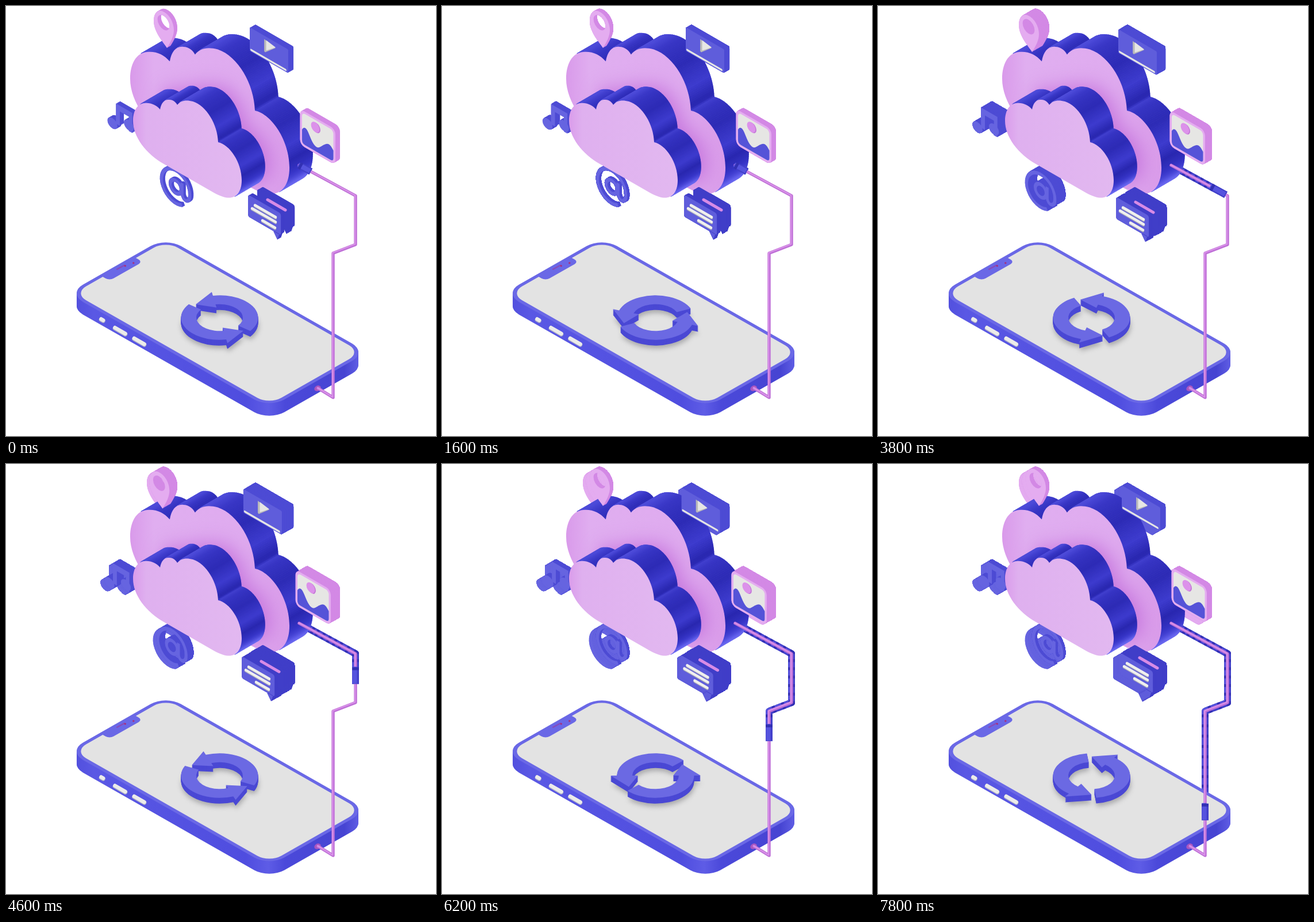
An HTML page with a canvas that plays this animation: 748x748 px, repeating every 8 s.

```html
<!DOCTYPE html>
<html lang="en">
<head>
<meta charset="utf-8">
<title>Cloud sync</title>
<style>
  html, body { margin: 0; width: 100%; height: 100%; overflow: hidden; background: #fff; }
  canvas { display: block; width: 748px; height: 748px; }
  svg { position: absolute; width: 0; height: 0; }
</style>
</head>
<body>
<canvas id="stage" width="748" height="748"></canvas>
<svg><path id="cloud" d="M221 200C221 183 228 170 241 169C252 168 261 172 268 180C270 168 276 162 284 163C291 163 296 168 298 172C304 164 314 163 325 166C349 174 368 206 369 237C389 241 410 272 410 303C410 327 397 338 378 332C371 330 366 327 362 325L275 275C243 257 221 227 221 200Z"/></svg>
<script>
const SIZE = 748, STEP = 200, LOOP = 8000, SLOPE = 0.577;
const BLUE = '#6664e0', BLUE_SIDE = '#4d4bd4', PANEL = '#5f5ddb', PANEL_SIDE = '#403ec8';
const PINK = '#e4acf0', PINK_SIDE = '#d389e5', PALE = '#e6e6e4';

const stage = document.getElementById('stage').getContext('2d');
const makeLayer = () => {
  const c = document.createElement('canvas');
  c.width = c.height = SIZE;
  return c.getContext('2d');
};

// Linear lookup in a table of [key, value...] rows.
function lookup(table, x) {
  if (x <= table[0][0]) return table[0].slice(1);
  const i = table.findIndex(row => row[0] >= x);
  if (i < 0) return table[table.length - 1].slice(1);
  const a = table[i - 1], b = table[i], k = (x - a[0]) / (b[0] - a[0]);
  return a.slice(1).map((v, j) => v + (b[j + 1] - v) * k);
}

// Run a drawing with a wall-facing isometric plane at (x, y).
function onWall(c, x, y, draw) {
  c.save();
  c.transform(0.866, 0.5, 0, 1, x, y);
  draw();
  c.restore();
}

function fillPath(c, path, color, rule = 'nonzero') {
  c.fillStyle = color;
  c.fill(path, rule);
}

// Stack slices from the back (depth) to the front (-reach), the last one being the face.
function extrude(c, x, y, depth, reach, side, face, draw) {
  for (let k = depth; k > -reach; k -= 0.8) onWall(c, x + k, y - k * SLOPE, () => draw(side));
  onWall(c, x - reach, y + reach * SLOPE, () => draw(face));
}

function roundRect(x, y, w, h, r) {
  const p = new Path2D();
  p.roundRect(x, y, w, h, r);
  return p;
}

function line(c, x1, y1, x2, y2, width, color) {
  c.lineCap = 'round';
  c.lineWidth = width;
  c.strokeStyle = color;
  c.beginPath();
  c.moveTo(x1, y1);
  c.lineTo(x2, y2);
  c.stroke();
}

// ---------- floating icons ----------
const reach = {
  pin: [[2, 0], [3, 8], [3.7, 12], [4.1, 12], [5.5, 0]],
  music: [[1.4, 0], [1.6, 1.6], [2.6, 12], [3.8, 12], [5.2, 0]],
  mail: [[1.8, 0], [3, 9.5], [3.6, 12], [3.9, 12], [5.4, 0]],
  video: [[3, 0], [3.8, 6], [4.9, 13], [5.6, 13], [7, 0]],
  photo: [[3.1, 0], [3.8, 4], [5.2, 11], [5.7, 11], [7, 3.5], [7.8, 1]],
  chat: [[3, 0], [3.8, 7], [4.8, 12], [5.6, 12], [6.9, 0]]
};

// The pin outline is given in screen space, so it is slid rather than skewed.
const pinShape = new Path2D('M280 73C273 62 257 45 257 26C257 12 264 6 272 9C284 14 292 28 292 42C292 52 287 62 280 73Z');
pinShape.addPath(roundRect(-12, -12, 24, 24, 12), new DOMMatrix([0.866, 0.5, 0, 1, 274, 29]));

const noteShape = new Path2D('M-1 -33H32V2H25V-23H7V2H-1Z');
noteShape.ellipse(-8, 5, 10, 9, 0, 0, 7);
noteShape.moveTo(35, -8);
noteShape.ellipse(25, -8, 10, 9, 0, 0, 7);

const mailShape = new Path2D();
mailShape.arc(0, 0, 28.5, 1.1, 6.35);
mailShape.bezierCurveTo(28, 16, 14, 18, 13, 6);
mailShape.lineTo(13, -13);
mailShape.moveTo(11, 0);
mailShape.arc(0, 0, 11, 0, 6.3);

const card = roundRect(0, 0, 77.4, 41, 2);
const frame = roundRect(0, 0, 71, 62, 9);
const hill = new Path2D('M4 34C8 26 13 26 18 35C25 47 31 53 38 48C46 41 54 30 60 33C63 34 65 37 67 39V52Q67 58 61 58H10Q4 58 4 52Z');
const bubble = roundRect(0, 0, 66, 38, 4);
bubble.addPath(new Path2D('M50 37L59 49L63 37Z'));

function slidePin(c, k, color) {
  c.save();
  c.translate(k, -k * SLOPE);
  fillPath(c, pinShape, color, 'evenodd');
  c.restore();
}

const bodies = {
  pin(c, d) {
    for (let k = 6; k > -d; k -= 0.8) slidePin(c, k, PINK_SIDE);
    slidePin(c, -d, PINK);
  },
  music(c, d) {
    extrude(c, 192, 203, 7, d, BLUE_SIDE, BLUE, color => fillPath(c, noteShape, color));
  },
  mail(c, d) {
    extrude(c, 295, 314.5, 4, d, BLUE_SIDE, BLUE, color => {
      c.lineCap = 'butt';
      c.lineWidth = 6;
      c.strokeStyle = color;
      c.stroke(mailShape);
    });
  },
  video(c, d) {
    extrude(c, 424, 37, 9, d, BLUE_SIDE, PANEL, color => fillPath(c, card, color));
  },
  photo(c, d) {
    extrude(c, 511.5, 179, 8, d, PINK_SIDE, PINK, color => fillPath(c, frame, color));
  },
  chat(c, d) {
    extrude(c, 437, 318, 8, d, PANEL_SIDE, PANEL_SIDE, color => fillPath(c, bubble, color));
    line(c, 455 - d, 337 + d * SLOPE, 486 - d, 355 + d * SLOPE, 5, '#d78be6');
    extrude(c, 421, 328, 6 - d, d, PANEL_SIDE, PANEL, color => fillPath(c, bubble, color));
  }
};

const details = {
  video(c, d) {
    onWall(c, 424 - d, 37 + d * SLOPE, () => {
      fillPath(c, new Path2D('M29 6L52 10L31 28L29 27Z'), '#b9b9ba');
      fillPath(c, new Path2D('M33 6L52 9L33 24Z'), PALE);
      line(c, 3, 38, 72, 38, 3.6, PALE);
    });
  },
  photo(c, d) {
    onWall(c, 511.5 - d, 179 + d * SLOPE, () => {
      fillPath(c, roundRect(4, 4, 63, 54, 6), PALE);
      fillPath(c, hill, '#5553d8');
      fillPath(c, roundRect(24, 8, 17, 17, 9), '#c577d8');
      fillPath(c, roundRect(22, 8, 17, 17, 9), '#dc92ea');
    });
  },
  chat(c, d) {
    c.save();
    c.translate(-d, d * SLOPE);
    for (const [x, y, w] of [[433, 346.5, 36], [428, 352, 41], [446, 373, 22]]) {
      line(c, x, y + 1.5, x + w, y + 1.5 + w * SLOPE, 4.5, '#a9a9b8');
      line(c, x, y, x + w, y + w * SLOPE, 4.5, '#f0f0ee');
    }
    c.restore();
  }
};

function drawIcons(c, parts, names, t) {
  for (const name of names) if (parts[name]) parts[name](c, lookup(reach[name], t)[0]);
}

// ---------- cable and plug ----------
const cable = new Path2D('M510 277L608 330V415L569 430V681L543 665');
const plugEnd = [[1.6, 23], [2, 26], [2.5, 40], [3, 62], [3.8, 108], [4.7, 171], [5.6, 238], [6.3, 299], [7, 362], [7.8, 428]];

function drawCable(c) {
  c.lineCap = c.lineJoin = 'round';
  c.lineWidth = 5.4;
  c.strokeStyle = '#bf70d7';
  c.stroke(cable);
  c.lineWidth = 2.2;
  c.strokeStyle = '#d992e8';
  c.save();
  c.translate(-0.8, -0.8);
  c.stroke(cable);
  c.restore();
}

function drawPlug(c, t) {
  const end = lookup(plugEnd, t)[0], start = Math.max(0, end - 29);
  const band = (from, to, width, color) => {
    c.setLineDash([0, from, to - from, 2000]);
    c.lineWidth = width;
    c.strokeStyle = color;
    c.stroke(cable);
  };
  c.save();
  c.lineCap = 'butt';
  c.lineJoin = 'round';
  band(start, end, 12, '#4240ca');
  c.translate(-1.5, -1);
  band(start, end, 8, '#5553de');
  c.translate(1.5, 1);
  band(start, start + 5, 12, '#3230b4');
  c.restore();
}

// ---------- phone ----------
const FLOOR = [0.874, 0.498, 0.874, -0.498];

function drawPhone(c) {
  const body = roundRect(-200.5, -97.5, 401, 195, 30);
  const side = c.createLinearGradient(123, 0, 613, 0);
  [[0, '#5250de'], [0.06, '#5a58e4'], [0.6, '#4f4ddf'], [0.68, '#5e5ce6'], [0.74, '#4b49da'], [0.95, '#4644d2'], [1, '#5f5de4']]
    .forEach(([p, color]) => side.addColorStop(p, color));
  for (let k = 22; k > 0; k--) {
    const slice = new Path2D();
    slice.addPath(body, new DOMMatrix([...FLOOR, 368, 551 + k]));
    fillPath(c, slice, side);
  }
  c.save();
  c.transform(...FLOOR, 368, 551);
  fillPath(c, body, '#6a68e6');
  fillPath(c, roundRect(-194.5, -91.5, 389, 183, 24), '#e3e3e3');
  fillPath(c, roundRect(-197, -34, 16, 66, [0, 8, 8, 0]), '#6a68e6');
  c.restore();
  line(c, 193, 458, 206, 451, 2, '#8a4bb8');
  line(c, 207, 452, 207.5, 452, 3, '#a8307a');
  line(c, 221.5, 447, 222, 447, 3, '#a8307a');
  for (const [x, y, w] of [[165.5, 544.5, 3.5], [189.5, 559.5, 18], [223, 578, 17.5]]) {
    line(c, x, y + 1, x + w, y + 1 + w * SLOPE, 7.5, '#b4b4c8');
    line(c, x, y, x + w, y + w * SLOPE, 6.5, '#ececea');
  }
  c.fillStyle = '#a956bf';
  c.beginPath();
  c.ellipse(542, 665, 6, 4.5, -0.5, 0, 7);
  c.fill();
}

// ---------- sync arrows ----------
const turn = [[0, 100], [1.6, 161], [3, 222], [3.8, 254], [5.6, 337], [7, 391], [7.8, 414]];

function arrowsPath(deg) {
  const p = new Path2D();
  const rad = a => -a * Math.PI / 180;
  const to = (r, a) => p.lineTo(r * Math.cos(rad(a)), r * Math.sin(rad(a)));
  for (const head of [deg, deg + 180]) {
    const tail = head - 137;
    p.moveTo(54.7 * Math.cos(rad(tail)), 54.7 * Math.sin(rad(tail)));
    p.arc(0, 0, 54.7, rad(tail), rad(head), true);
    to(64, head);
    to(47, head + 36);
    to(25, head);
    p.arc(0, 0, 33, rad(head), rad(tail), false);
    p.closePath();
  }
  return p;
}

function drawSync(c, t) {
  const arrows = arrowsPath(lookup(turn, t)[0]);
  const slice = (dx, dy, color) => {
    c.save();
    c.translate(371.5 + dx, 542 + dy);
    c.scale(1.2247, 0.7071);
    fillPath(c, arrows, color);
    c.restore();
  };
  c.save();
  c.filter = 'blur(4px)';
  slice(1, 15, 'rgba(110,110,115,.5)');
  c.restore();
  for (let k = 10; k > 0; k--) slice(0, k, '#4a48d4');
  slice(0, 0, '#6b69e3');
}

// ---------- clouds ----------
// Wall colour by the direction the wall faces, in degrees on screen.
const ramp = [[-140, 90, 88, 220], [-90, 76, 74, 216], [-60, 56, 54, 196], [-35, 46, 44, 182], [-18, 62, 60, 206],
  [-6, 42, 40, 176], [8, 56, 54, 200], [30, 96, 94, 234], [60, 122, 120, 244]];
const cloudLine = document.getElementById('cloud');
const cloudPath = new Path2D(cloudLine.getAttribute('d'));
const RISE = 0.585;

function cloudWalls(c, sx, sy, ox, oy) {
  const total = cloudLine.getTotalLength(), count = 260, points = [], walls = [];
  for (let i = 0; i <= count; i++) {
    const p = cloudLine.getPointAtLength(total * i / count);
    points.push([p.x * sx + ox, p.y * sy + oy]);
  }
  for (let i = 0; i < count; i++) {
    const [x, y] = points[i], dx = points[i + 1][0] - x, dy = points[i + 1][1] - y;
    if (dy + RISE * dx <= 0) continue;
    const facing = Math.atan2(-dx, dy) * 180 / Math.PI;
    walls.push({ x, y, dx, dy, color: `rgb(${lookup(ramp, facing).map(Math.round)})` });
  }
  for (let k = 40; k >= 0; k -= 0.8) {
    for (const w of walls) line(c, w.x + k, w.y - k * RISE, w.x + w.dx + k, w.y + w.dy - k * RISE, 1.6, w.color);
  }
}

function drawCloud(c, sx, sy, ox, oy, stops, shadow) {
  cloudWalls(c, sx, sy, ox, oy);
  const face = new Path2D();
  face.addPath(cloudPath, new DOMMatrix([sx, 0, 0, sy, ox, oy]));
  const tint = c.createLinearGradient(221 * sx + ox, 0, 410 * sx + ox, 0);
  stops.forEach(([p, color]) => tint.addColorStop(p, color));
  fillPath(c, face, tint);
  if (shadow) {
    c.save();
    c.clip(face);
    c.filter = 'blur(16px)';
    c.translate(50, -27);
    fillPath(c, cloudPath, 'rgba(190,100,215,.75)');
    c.restore();
  }
}

// ---------- layers ----------
const scenery = makeLayer();
drawPhone(scenery);
drawCloud(scenery, 1.466, 1.5, -108, -173.5, [[0, '#d99aea'], [0.15, '#e0aef0'], [0.7, '#dfabef'], [1, '#da9cea']], true);
drawCloud(scenery, 1, 1, 0, 0, [[0, '#da9ceb'], [0.12, '#dfb0ef'], [1, '#e2b8f0']], false);

const trail = makeLayer();
const allIcons = Object.keys(bodies), frontIcons = ['pin', 'video', 'photo', 'chat'];
let drawn = 0, shown = -1;

// Moving parts leave traces on the empty background, so every step up to now is laid down in turn.
function layTrail(step) {
  if (step < drawn) {
    trail.clearRect(0, 0, SIZE, SIZE);
    drawn = 0;
  }
  for (; drawn <= step; drawn++) {
    const t = drawn * STEP / 1000;
    drawIcons(trail, bodies, allIcons, t);
    drawPlug(trail, t);
  }
}

function render(step) {
  const t = step * STEP / 1000;
  layTrail(step);
  stage.fillStyle = '#fff';
  stage.fillRect(0, 0, SIZE, SIZE);
  stage.drawImage(trail.canvas, 0, 0);
  stage.drawImage(scenery.canvas, 0, 0);
  drawSync(stage, t);
  drawCable(stage);
  drawPlug(stage, t);
  drawIcons(stage, bodies, frontIcons, t);
  drawIcons(stage, details, frontIcons, t);
}

const begin = performance.now();
function tick() {
  const step = Math.floor((performance.now() - begin) % LOOP / STEP);
  if (step !== shown) render(shown = step);
  requestAnimationFrame(tick);
}
tick();
</script>
</body>
</html>
```
